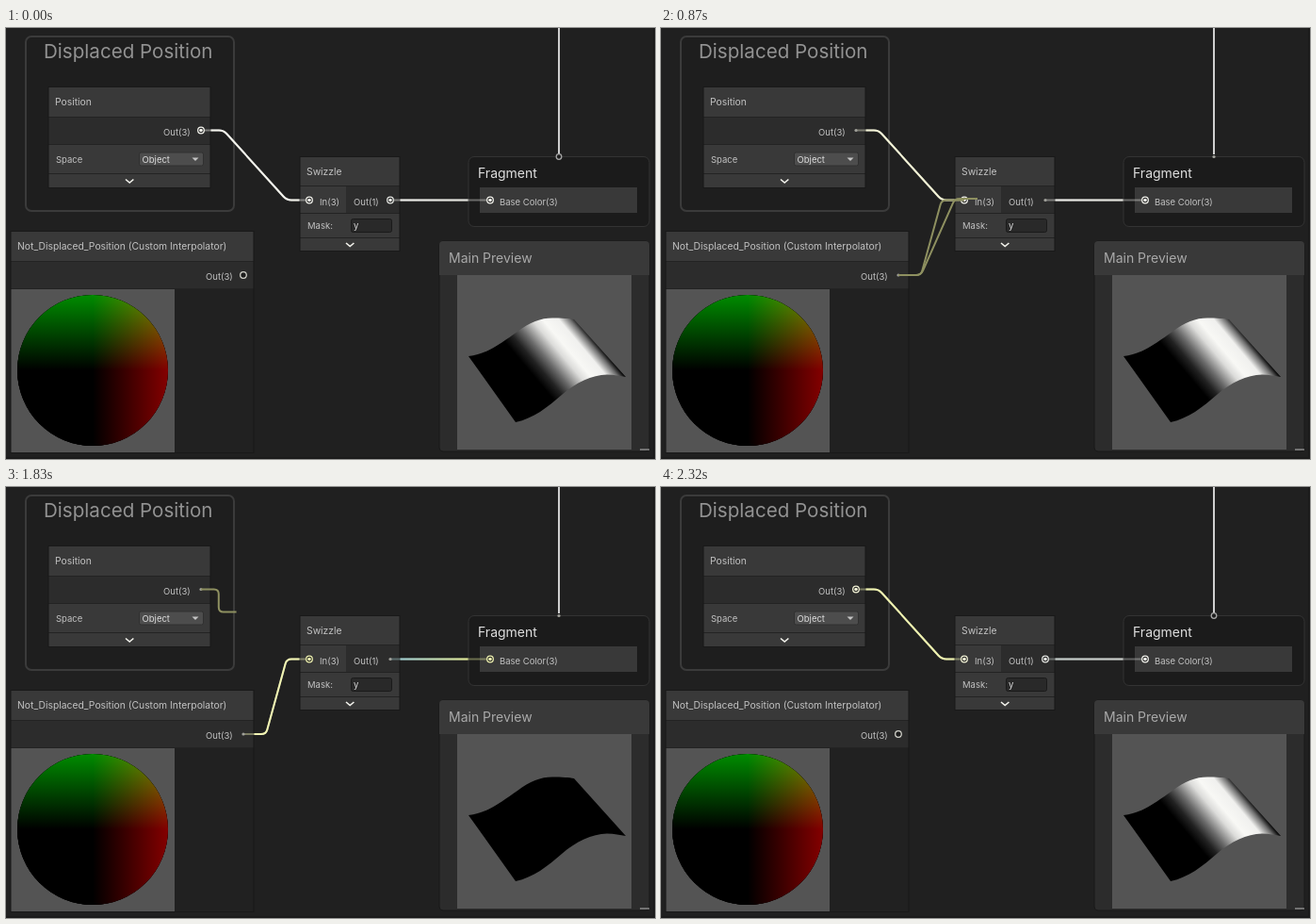
Animation, 689 px wide and 457 px high, one loop 2.77 s. Source, as an HTML page:

```html
<!DOCTYPE html>
<html lang="en">
<head>
<meta charset="utf-8">
<title>Shader graph</title>
<style>
  html, body { margin: 0; width: 100%; height: 100%; overflow: hidden; background: #202020; }
  svg { display: block; width: 100%; height: 100%; }
  text { font: 9.5px Inter, "Liberation Sans", sans-serif; font-optical-sizing: none; fill: #c2c2c2; }
  .title { font-size: 10.35px; }
  .panel { font-size: 14px; }
  .group { font-size: 20.6px; fill: #929292; }
  .head, .cell { fill: #393939; }
  .row { fill: #2c2c2c; }
  .rim { fill: none; stroke: #191919; }
  .rule { stroke: #232323; }
  .wire { fill: none; stroke-width: 2; stroke-linejoin: round; }
  .faint { opacity: .4; }
  .drag { stroke: #8e9060; }
  .chev { fill: none; stroke: #f4f4ee; stroke-width: 1.6; }
  .thin { stroke: #b4b4b4; stroke-width: 1.1; }
  .hover { fill: none; stroke: #35718c; stroke-width: 1.4; }
  .lit { mix-blend-mode: screen; }
</style>
</head>
<body>
<svg viewBox="0 0 689 457" preserveAspectRatio="none">
  <defs>
    <linearGradient id="green" x1="0" y1="0" x2="0" y2="1">
      <stop offset="0" stop-color="#008c00"/><stop offset=".5" stop-color="#000"/>
    </linearGradient>
    <linearGradient id="red" x1="1" y1="0" x2="0" y2="0">
      <stop offset="0" stop-color="#840000"/><stop offset=".5" stop-color="#000"/>
    </linearGradient>
    <linearGradient id="ridge" gradientUnits="userSpaceOnUse" x1="145.2" y1="-122.6" x2="201.7" y2="-170.3">
      <stop offset="0" stop-color="#000"/>
      <stop offset=".14" stop-color="#222"/>
      <stop offset=".3" stop-color="#6c6c6c"/>
      <stop offset=".5" stop-color="#dcdcda"/>
      <stop offset=".62" stop-color="#f8f8f5"/>
      <stop offset=".8" stop-color="#f0f0ee"/>
      <stop offset=".92" stop-color="#707070"/>
      <stop offset="1" stop-color="#000"/>
    </linearGradient>
    <linearGradient id="mix" gradientUnits="userSpaceOnUse" x1="412" y1="0" x2="510" y2="0">
      <stop id="mixA" offset=".1"/><stop id="mixB" offset=".8"/>
    </linearGradient>
  </defs>

  <rect width="689" height="457" fill="#202020"/>
  <path d="M688 0V457M0 456H689" stroke="#1b1b1b" stroke-width="2"/>

  <rect x="21" y="9" width="221" height="185" rx="6" fill="#1e1e1e" stroke="#3b3b3b" stroke-width="2"/>
  <text class="group" x="40" y="31.5">Displaced Position</text>

  <path d="M587 0V134" stroke="#cfcfcf" stroke-width="2"/>
  <g id="wires"></g>

  <!-- Position -->
  <rect class="head" x="45" y="63" width="172" height="31"/>
  <rect class="row" x="45" y="94" width="172" height="30"/>
  <rect class="cell" x="45" y="124" width="172" height="45"/>
  <path class="rule" d="M45 94.5H217M45 123.5H217M45 154.5H217"/>
  <rect class="rim" x="45" y="62.5" width="172" height="107"/>
  <text class="title" x="52" y="82">Position</text>
  <text x="167" y="114">Out(3)</text>
  <text x="53" y="143">Space</text>
  <rect x="141.5" y="132" width="68" height="14" rx="2" fill="#4d4d4d" stroke="#303030"/>
  <text x="144.5" y="142.8" style="fill:#dcdcdc">Object</text>
  <path d="M197.500 137.500h7l-3.500 3.500z" fill="#c4c4c4"/>
  <path class="chev" d="M127 160.500l4.200 3.500l4.200-3.500"/>

  <!-- Swizzle -->
  <rect class="head" x="312" y="137" width="106" height="99"/>
  <rect class="row" x="361" y="168" width="57" height="28"/>
  <path class="rule" d="M312 167.500H418M312 196.500H418M312 222.500H418"/>
  <rect class="rim" x="312" y="136.500" width="106" height="100"/>
  <text class="title" x="319" y="156">Swizzle</text>
  <text x="333" y="188">In(3)</text>
  <text x="369" y="188">Out(1)</text>
  <text x="320" y="213">Mask:</text>
  <rect x="366.500" y="202.500" width="43" height="14" rx="2" fill="#292929" stroke="#1a1a1a"/>
  <text x="369" y="213" style="fill:#dcdcdc">y</text>
  <path class="chev" d="M361 228l4.200 3.500l4.200-3.500"/>

  <!-- Fragment -->
  <rect x="491" y="136.500" width="192" height="74" rx="6" fill="#1b1b1b" stroke="#333"/>
  <rect class="cell" x="503" y="169" width="167" height="27"/>
  <text class="panel" x="501" y="159" style="fill:#dedede">Fragment</text>
  <text x="524" y="188">Base Color(3)</text>

  <!-- Custom interpolator -->
  <rect x="5" y="216" width="258" height="235" fill="#212121"/>
  <rect class="head" x="5" y="216" width="258" height="31"/>
  <rect class="row" x="5" y="247" width="258" height="29"/>
  <path class="rule" d="M5 247.500H263M5 276.500H263"/>
  <rect x="5" y="277" width="174" height="173" fill="#545454"/>
  <rect class="rim" x="5" y="215.500" width="258" height="235"/>
  <text class="title" x="12" y="235">Not_Displaced_Position (Custom Interpolator)</text>
  <text x="212" y="267">Out(3)</text>
  <g style="isolation:isolate">
    <circle cx="92" cy="363" r="80"/>
    <circle class="lit" cx="92" cy="363" r="80" fill="url(#green)"/>
    <circle class="lit" cx="92" cy="363" r="80" fill="url(#red)"/>
  </g>

  <!-- Main preview -->
  <rect x="460" y="226" width="223" height="223" rx="4" fill="#2c2c2c" stroke="#191919"/>
  <path d="M460 262V230q0-4 4-4H679q4 0 4 4V262z" fill="#393939"/>
  <text class="panel" x="470" y="249" style="fill:#a9a9a9">Main Preview</text>
  <rect x="479" y="262" width="185" height="185" fill="#545454"/>
  <path id="sheet" d="M491 348C512 346 528 332 543 322C556 312 568 307.500 580 307.500C590 307.500 598 308 603 309L658 370C652 369 646 367.500 638 367.500C622 368 605 376 590 389C575 402 560 414 541 418z"/>
  <path d="M673 447H683" stroke="#8a8a8a" stroke-width="1.500"/>

  <g id="overlay" class="faint"></g>
  <g id="ports"></g>

  <rect id="hoverPos" class="hover" x="43" y="60.500" width="176" height="111" rx="4"/>
  <path id="menuPos" class="chev thin" d="M203 77l3.700 3.500l3.700-3.500"/>
  <rect id="hoverInt" class="hover" x="3" y="214" width="261.500" height="238.500" rx="5"/>
  <path id="menuInt" class="chev thin" d="M248.500 230.500l3.700 3.500l3.700-3.500"/>
  <g id="fold">
    <rect x="84" y="280.500" width="16" height="16" fill="#1f1f1f" stroke="#a0a0a0"/>
    <path class="chev" style="stroke-width:1.200" d="M88 290.500l4-3.800l4 3.800"/>
  </g>
  <path id="ghost" class="wire drag"/>
  <path id="pull" class="wire drag"/>
</svg>

<script>
const LOOP = 2770;
const NS = "http://www.w3.org/2000/svg";
const $ = id => document.getElementById(id);
const POS = [207, 108.500], INT = [252, 262], IN = [322, 182.500];

function add(parent, tag, attrs) {
  const el = document.createElementNS(NS, tag);
  for (const k in attrs) el.setAttribute(k, attrs[k]);
  return parent.appendChild(el);
}
function show(el, on) {
  el.style.display = on ? "" : "none";
}

// Flat stub, slanted middle, flat stub, with softened corners
function wirePath([x1, y1], [x2, y2]) {
  const stub = Math.min(24, Math.max(0, (x2 - x1) / 2));
  const a = x1 + stub, b = x2 - stub;
  const len = Math.hypot(b - a, y2 - y1) || 1;
  const r = Math.min(5, stub, len / 2);
  const ux = (b - a) / len * r, uy = (y2 - y1) / len * r;
  return `M${x1} ${y1}H${a - r}Q${a} ${y1} ${a + ux} ${y1 + uy}` +
    `L${b - ux} ${y2 - uy}Q${b} ${y2} ${b + r} ${y2}H${x2}`;
}

// Each wire is bright between nodes and faint over them
function makeWire(d) {
  const parts = ["wires", "overlay"].map(id => add($(id), "path", { class: "wire", d }));
  return (on, color) => parts.forEach(p => {
    show(p, on);
    p.setAttribute("stroke", color);
  });
}
function makePort(x, y, size = 3.300) {
  const ring = add($("ports"), "circle", { cx: x, cy: y, r: size, fill: "#1d1d1d", "stroke-width": 1.300 });
  const dot = add($("ports"), "circle", { cx: x, cy: y });
  return (state, color) => {
    show(ring, state !== "dim");
    show(dot, state !== "open");
    ring.setAttribute("stroke", color);
    dot.setAttribute("r", state === "dim" ? 1.600 : 1.800);
    dot.setAttribute("fill", state === "dim" ? "#a0a09a" : color);
  };
}

const posWire = makeWire(wirePath(POS, IN));
const intWire = makeWire(wirePath(INT, IN));
const outWire = makeWire("M408 182.500H514");
const posPort = makePort(...POS), intPort = makePort(...INT), inPort = makePort(...IN);
const outPort = makePort(408, 182.500), basePort = makePort(514, 182.500);
const topPort = makePort(587, 136.500, 2.800);

const WHITE = "#f2f2ec", PALE = "#f2f2d6", YELLOW = "#eef1b0";

// [start time, left colour, right colour] of the output wire
const OUT_TINTS = [
  [0, "#eeeeea", "#e4e4de"],
  [1100, "#82dcd4", "#dfeaa6"],
  [1650, "#a4d0d0", "#e2ea98"],
  [2210, "#c6cecb", "#ccd0cc"]
];
const DRAGS = [
  { start: 630, reach: 870, end: 1060, steps: 5, snap: 820, port: INT, from: [254, 262], to: [336, 181] },
  { start: 1650, reach: 2060, end: 2160, steps: 8, snap: 2000, port: POS, from: [212, 108.500], to: [315, 184] }
];

function cursorAt(drag, t) {
  const raw = Math.min(1, (t - drag.start) / (drag.reach - drag.start));
  const p = Math.floor(raw * drag.steps + 1e-6) / drag.steps;
  const e = p * p * (3 - 2 * p);
  return drag.from.map((v, i) => v + (drag.to[i] - v) * e);
}

function render(t) {
  const within = (a, b) => t >= a && t < b;
  const drag = DRAGS.find(d => within(d.start, d.end));
  const swapped = within(1060, 2160);

  posWire(!swapped, t < 630 ? WHITE : t < 1060 ? PALE : YELLOW);
  intWire(swapped, t < 1650 ? "#e6ecb8" : "#f2f5b4");
  const tint = OUT_TINTS.filter(row => t >= row[0]).pop();
  $("mixA").setAttribute("stop-color", tint[1]);
  $("mixB").setAttribute("stop-color", tint[2]);
  outWire(true, "url(#mix)");

  const state = linked => drag ? "dim" : linked ? "on" : "open";
  posPort(state(!swapped || within(1370, 1650)), t < 1060 ? WHITE : t < 2160 ? "#d4d4cc" : PALE);
  intPort(state(swapped || within(350, 630)), within(350, 630) || swapped ? YELLOW : "#d4d4cc");
  inPort("on", t < 1060 ? WHITE : swapped ? YELLOW : PALE);
  outPort(state(true), within(1100, 2210) ? "#b4dcd8" : "#e4e6e2");
  basePort("on", within(1100, 2210) ? YELLOW : WHITE);
  topPort(drag ? "dim" : "open", "#a4a4a4");

  $("sheet").setAttribute("fill", within(1140, 2320) ? "#000" : "url(#ridge)");

  show($("hoverInt"), within(270, 680));
  show($("menuInt"), within(270, 680));
  show($("fold"), within(270, 680));
  show($("hoverPos"), within(1320, 1650));
  show($("menuPos"), within(1320, 1650));

  show($("pull"), drag);
  show($("ghost"), drag && t >= drag.snap);
  if (drag) {
    $("pull").setAttribute("d", wirePath(drag.port, cursorAt(drag, t)));
    $("ghost").setAttribute("d", wirePath(drag.port, IN));
  }
}

const begin = performance.now();
function tick() {
  render((performance.now() - begin) % LOOP);
  requestAnimationFrame(tick);
}
render(0);
requestAnimationFrame(tick);
</script>
</body>
</html>
```
